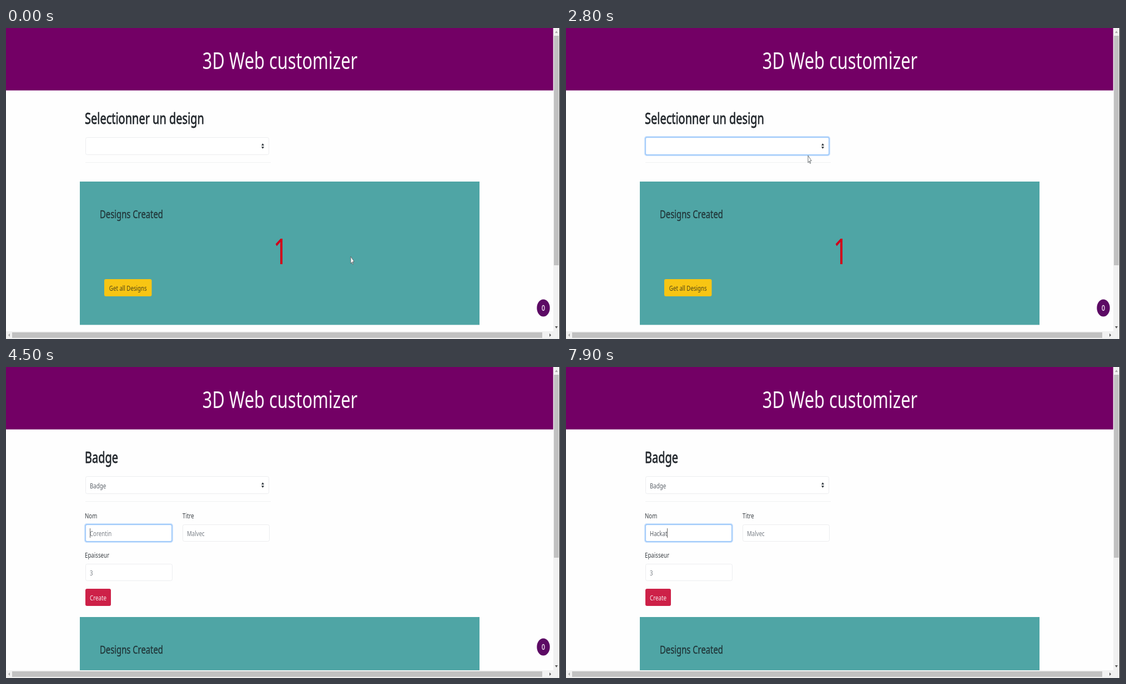
Recreate the animation shown at these times as an HTML page with a canvas. Size 998 by 561 pixels, loop 8 s.

```html
<!DOCTYPE html>
<html lang="fr">
<head>
<meta charset="utf-8">
<title>3D Web customizer</title>
<style>
  html, body { margin: 0; width: 100%; height: 100%; overflow: hidden; background: #fefefe; }
  canvas { display: block; width: 998px; height: 561px; }
</style>
</head>
<body>
<canvas id="stage" width="998" height="561"></canvas>
<script>
const ctx = document.getElementById('stage').getContext('2d');
const LOOP = 8000;
const SQUEEZE = 0.74; // the whole page is shown narrowed
const INK = '#24292e', LABEL = '#3b4045', VALUE = '#5b6168', HINT = '#7b8087';
const SMALL = 13.1;

const SELECT_FOCUS = 1700, FORM_SHOWN = 2900, INPUT_FOCUS = 4300, BADGE_GONE = 5800;
const WORD = 'Hackat';
const KEYS = [5300, 5700, 6600, 6900, 7400, 7800];
const BLINK = 530;

// Pointer legs: start, end, from, to
const MOVES = [
  [300, 1400, [621, 412], [437, 225]],
  [2000, 2500, [437, 225], [436, 230]],
  [3950, 4300, [436, 230], [190, 294]]
];

function rect(x, y, w, h, color) {
  ctx.fillStyle = color;
  ctx.fillRect(x, y, w, h);
}

function rounded(x, y, w, h, r) {
  ctx.beginPath();
  ctx.roundRect(x, y, w, h, r);
}

function outline(x, y, w, h, line, color) {
  rounded(x, y, w, h, 3);
  ctx.lineWidth = line;
  ctx.strokeStyle = color;
  ctx.stroke();
}

function poly(points, color) {
  ctx.beginPath();
  points.forEach(([x, y]) => ctx.lineTo(x, y));
  ctx.closePath();
  ctx.fillStyle = color;
  ctx.fill();
}

// Draws text and returns its width on the stage; "heavy" thickens the strokes
function text(str, x, y, size, color, { align = 'left', heavy = 0 } = {}) {
  ctx.save();
  ctx.translate(x, y);
  ctx.scale(SQUEEZE, 1);
  ctx.font = `${size}px "Noto Sans", "Open Sans", sans-serif`;
  ctx.textAlign = align;
  ctx.fillStyle = ctx.strokeStyle = color;
  ctx.fillText(str, 0, 0);
  if (heavy) {
    ctx.lineWidth = heavy;
    ctx.lineJoin = 'round';
    ctx.strokeText(str, 0, 0);
  }
  const width = ctx.measureText(str).width * SQUEEZE;
  ctx.restore();
  return width;
}

function button(label, x, y, w, h, fill, color) {
  rounded(x, y, w, h, 3);
  ctx.fillStyle = fill;
  ctx.fill();
  text(label, x + w / 2, y + h / 2 + 5.2, SMALL, color, { align: 'center' });
}

function field(x, y, w, h, focused) {
  rect(x + 1, y + 1, w - 2, h - 2, '#fff');
  if (focused) {
    outline(x - 0.5, y - 0.5, w + 1, h + 1, 3.5, '#d8e9fd');
    outline(x, y, w, h, 1.8, '#a2cbfa');
  } else {
    outline(x + 0.5, y + 0.5, w - 1, h - 1, 1, '#ecedef');
  }
}

function header() {
  rect(0, 0, 985.7, 112.6, '#730065');
  text('3D Web customizer', 493.5, 73.7, 41.5, '#fbf5fb', { align: 'center' });
}

function selector(t) {
  const chosen = t >= FORM_SHOWN;
  text(chosen ? 'Badge' : 'Selectionner un design', 142, 172.5, 27, INK, { heavy: 0.8 });
  field(143, 197, 331, 32, t >= SELECT_FOCUS && t < INPUT_FOCUS);
  if (chosen) text('Badge', 151, 219, SMALL, VALUE);
  poly([[460, 212], [462.5, 208], [465, 212]], '#343a40');
  poly([[460, 214], [462.5, 218], [465, 214]], '#343a40');
  rect(143, 242, 334, 1, '#f0f1f2');
}

function caretOn(t, typed) {
  const since = typed ? KEYS[typed - 1] : INPUT_FOCUS;
  return Math.floor((t - since) / BLINK) % 2 === 0;
}

function form(t) {
  const typed = KEYS.filter(k => t >= k).length;
  const focused = t >= INPUT_FOCUS;

  text('Nom', 142, 272.5, SMALL, LABEL);
  field(143, 284, 156, 31, focused);
  const value = WORD.slice(0, typed);
  if (!typed) text('Corentin', 151, 305, SMALL, HINT);
  const width = typed ? text(value, 151, 305, SMALL, VALUE) : 0;
  if (focused && caretOn(t, typed)) rect(Math.floor(151 + width), 291, 1, 17, '#666');

  text('Titre', 318, 272.5, SMALL, LABEL);
  field(318, 284, 157, 31, false);
  text('Malvec', 326, 305, SMALL, HINT);

  text('Epaisseur', 142, 343.5, SMALL, LABEL);
  field(143, 355, 157, 31, false);
  text('3', 151, 376, SMALL, HINT);

  button('Create', 143, 400, 46, 31, '#cd2148', '#fbeef1');
}

function panel(y) {
  rect(133, y, 720, 258.5, '#4fa5a5');
  text('Designs Created', 169, y + 66, 20, '#22383b', { heavy: 0.45 });
  text('1', 481.5, y + 148.5, 63, '#d0021b');
  button('Get all Designs', 177, y + 176, 85.5, 31, '#f8c513', '#4f4418');
}

function badge() {
  ctx.beginPath();
  ctx.ellipse(968, 505, 11.7, 15.5, 0, 0, Math.PI * 2);
  ctx.fillStyle = '#5c0a64';
  ctx.fill();
  text('0', 968, 509.5, 14, '#f4eaf5', { align: 'center', heavy: 0.4 });
}

function scrollbars(thumbEnd) {
  rect(986, 0, 12, 561, '#f1f1f1');
  rect(0, 547, 998, 14, '#f1f1f1');
  rect(987, 14, 9, thumbEnd - 14, '#c1c1c1');
  rect(11, 549, 955, 10, '#c1c1c1');
  poly([[989, 9], [991.5, 5], [994, 9]], '#a9a9a9');
  poly([[989, 538], [991.5, 542], [994, 538]], '#555');
  poly([[7, 551], [4, 554], [7, 557]], '#a9a9a9');
  poly([[979, 551], [982, 554], [979, 557]], '#555');
  rect(997, 0, 1, 561, '#161616');
}

function pointer(t) {
  if (t >= INPUT_FOCUS) return;
  let pos = MOVES[0][2];
  for (const [start, end, from, to] of MOVES) {
    if (t < start) break;
    const p = Math.min(1, (t - start) / (end - start));
    const e = p * p * (3 - 2 * p);
    pos = from.map((v, i) => v + (to[i] - v) * e);
  }
  const shape = [[0, 0], [0, 13], [2, 10.5], [3.6, 14.5], [4.8, 13.8], [3.4, 9.8], [6.2, 9.5]];
  poly(shape.map(([x, y]) => [x + pos[0], y + pos[1]]), '#fff');
  ctx.lineWidth = 0.9;
  ctx.strokeStyle = '#5d6266';
  ctx.stroke();
}

function draw(t) {
  const open = t >= FORM_SHOWN;
  rect(0, 0, 998, 561, '#fefefe');
  header();
  selector(t);
  if (open) form(t);
  panel(open ? 451 : 277);
  if (t < BADGE_GONE) badge();
  scrollbars(open ? 344 : 428);
  pointer(t);
}

function frame() {
  draw(performance.now() % LOOP);
  requestAnimationFrame(frame);
}
frame();
</script>
</body>
</html>
```
